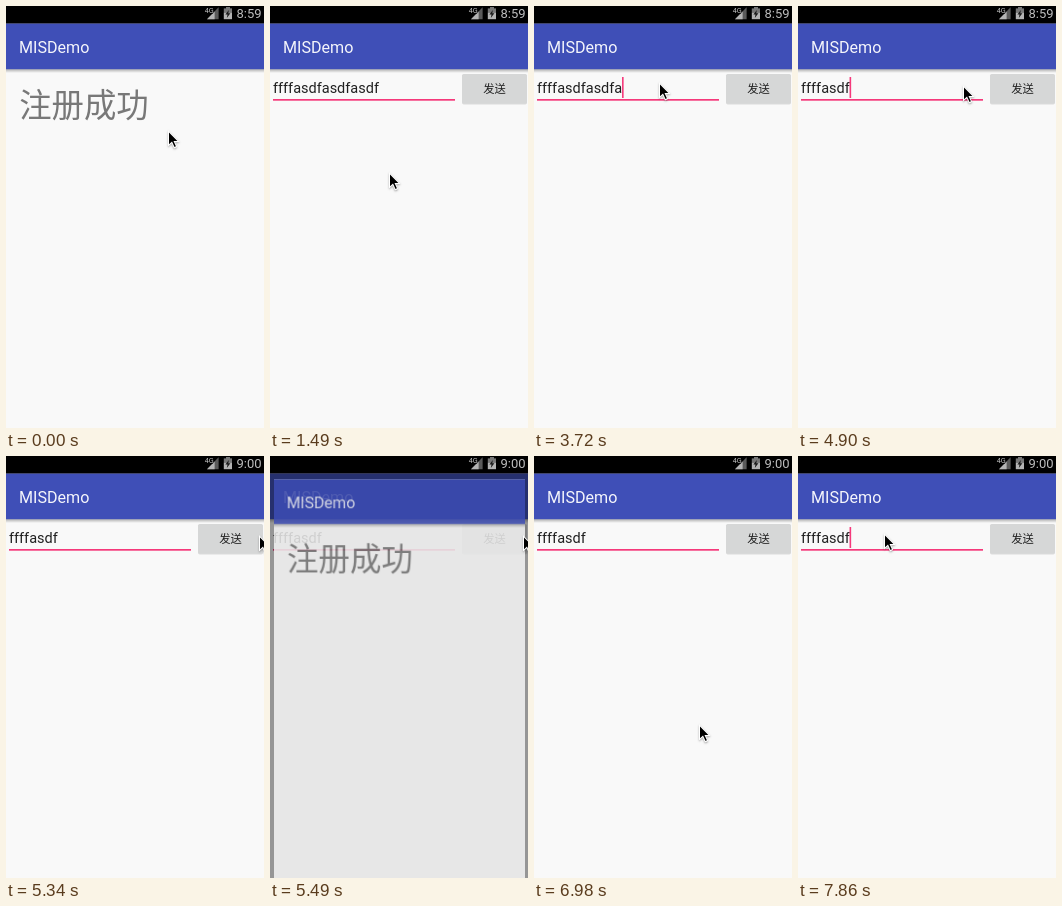
Write an HTML page with a canvas that moves like this. It is 258 by 422 pixels and loops after 8000 ms.

```html
<!DOCTYPE html>
<html lang="zh-CN">
<head>
<meta charset="utf-8">
<title>MISDemo</title>
<style>
html, body { margin: 0; width: 100%; height: 100%; overflow: hidden; background: #f9f9f9; }
canvas { display: block; width: 100%; height: 100%; }
</style>
</head>
<body>
<canvas id="stage"></canvas>
<script>
const W = 258, H = 422, LOOP = 8000;
const STATUS = 17.4, BAR_END = 63.2;
const WINDOW_H = 450; // the app window reaches past the lower edge of the stage
const ACCENT = '#f5397b';
const LATIN = 'Roboto, sans-serif';
const CJK = '"Noto Sans CJK SC", "Noto Sans CJK", sans-serif';
const ratio = window.devicePixelRatio || 1;

function setup(canvas, height) {
  canvas.width = W * ratio;
  canvas.height = height * ratio;
  const ctx = canvas.getContext('2d');
  ctx.scale(ratio, ratio);
  return ctx;
}
const ctx = setup(document.getElementById('stage'), H);
const layer = document.createElement('canvas');
const layerCtx = setup(layer, WINDOW_H);

// Each step changes part of the state and holds until the next one.
const steps = [
  [0, { page: 'done', text: 'ffffasdfasdfasdf', caret: false, handle: false, clock: '8:59', mouse: [162, 125] }],
  [140, { mouse: [146, 192] }],
  [290, { mouse: [119, 167] }],
  [1490, { page: 'form' }],
  [1640, { mouse: [110, 150] }],
  [1790, { mouse: [104, 125] }],
  [1940, { mouse: [116, 102] }],
  [2090, { mouse: [125, 85] }],
  [2230, { mouse: [125, 81] }],
  [2370, { mouse: [125, 78] }],
  [2520, { mouse: [125, 77] }],
  [2670, { caret: true }],
  [2820, { handle: true }],
  [3420, { text: 'ffffasdfasdfasd', handle: false }],
  [3570, { text: 'ffffasdfasdfas' }],
  [3720, { text: 'ffffasdfasdfa' }],
  [4310, { text: 'ffffasdfas' }],
  [4460, { text: 'ffffasdf' }],
  [4900, { mouse: [165, 80] }],
  [5050, { mouse: [215, 82], clock: '9:00' }],
  [5200, { mouse: [253, 80] }],
  [5340, { caret: false }],
  [5490, { page: 'opening' }],
  [5640, { page: 'done' }],
  [5780, { mouse: [215, 180] }],
  [5930, { mouse: [165, 269] }],
  [6980, { page: 'form' }],
  [7130, { mouse: [117, 132] }],
  [7280, { mouse: [98, 104] }],
  [7420, { mouse: [82, 84] }],
  [7710, { mouse: [86, 78] }],
  [7860, { caret: true }]
];

function stateAt(time) {
  return Object.assign({}, ...steps.filter(step => step[0] <= time).map(step => step[1]));
}

function rect(c, x, y, w, h, color) {
  c.fillStyle = color;
  c.fillRect(x, y, w, h);
}

function label(c, text, x, y, font, color, align = 'left') {
  c.font = font;
  c.fillStyle = color;
  c.textAlign = align;
  c.fillText(text, x, y);
}

function polygon(c, points, color) {
  c.beginPath();
  points.forEach(([x, y]) => c.lineTo(x, y));
  c.closePath();
  c.fillStyle = color;
  c.fill();
}

function drawPage(c) {
  rect(c, 0, STATUS, W, WINDOW_H, '#f9f9f9');
  const shade = c.createLinearGradient(0, 63, 0, 67);
  shade.addColorStop(0, 'rgba(0,0,0,.3)');
  shade.addColorStop(1, 'rgba(0,0,0,0)');
  rect(c, 0, 63, W, 4, shade);
  rect(c, 0, STATUS, W, BAR_END - STATUS, '#3f4fb7');
  label(c, 'MISDemo', 13, 47, '16.1px ' + LATIN, '#f4f5fb');
}

function drawDone(c) {
  drawPage(c);
  label(c, '注册成功', 13.2, 111.3, '500 32.4px ' + CJK, '#787878');
}

function drawForm(c, { text, caret, handle }) {
  drawPage(c);
  rect(c, 3, 93, 182, 1.7, ACCENT);
  label(c, text, 3, 87, '14.5px ' + LATIN, '#212121');
  const end = 3 + c.measureText(text).width;
  if (caret) rect(c, end - .2, 71, 1.6, 21, ACCENT);
  if (handle) drawHandle(c, end - .3);

  c.beginPath();
  c.roundRect(192, 68.6, 65, 30, 1.8);
  c.fillStyle = 'rgba(0,0,0,.12)';
  c.fill();
  c.beginPath();
  c.roundRect(192, 68, 65, 29.6, 1.8);
  c.fillStyle = '#d6d7d7';
  c.fill();
  label(c, '发送', 224.5, 87.3, '500 11.3px ' + CJK, '#212121', 'center');
}

function drawHandle(c, x) {
  c.fillStyle = ACCENT;
  c.beginPath();
  c.moveTo(x, 92);
  c.lineTo(x + 5.4, 97);
  c.arc(x, 102.5, 7.8, -Math.PI / 4, Math.PI * 1.25);
  c.closePath();
  c.fill();
}

function drawOpening(c, state) {
  drawForm(c, state);
  rect(c, 0, STATUS, W, H, 'rgba(0,0,0,.4)');
  layerCtx.clearRect(0, 0, W, WINDOW_H);
  drawDone(layerCtx);
  c.save();
  c.globalAlpha = .82;
  c.translate(150, 240);
  c.scale(.973, .973);
  c.translate(-150, -240);
  c.drawImage(layer, 0, 0, W, WINDOW_H);
  c.restore();
}

function drawStatus(c, clock) {
  rect(c, 0, 0, W, STATUS, '#000');
  polygon(c, [[201, 13.2], [212.6, 13.2], [212.6, 1.2]], '#5a5a5a');
  polygon(c, [[201, 13.2], [208.6, 13.2], [208.6, 5.4]], '#b4b4b4');
  rect(c, 198.5, 0, 8.6, 7.6, '#000');
  label(c, '4G', 198.8, 6.8, '7.2px ' + LATIN, '#c0c0c0');
  rect(c, 220, 1, 4, 2, '#777');
  rect(c, 217.8, 2.4, 8.2, 4, '#777');
  rect(c, 217.8, 6.4, 8.2, 6.8, '#b4b4b4');
  polygon(c, [[222.8, 4], [219.4, 8.6], [221.5, 8.6], [220.8, 12], [224.4, 7.2], [222.3, 7.2]], '#1a1a1a');
  label(c, clock, 255.5, 12, '13px ' + LATIN, '#bebebe', 'right');
}

function drawMouse(c, [x, y]) {
  c.save();
  c.translate(x, y);
  c.shadowColor = 'rgba(0,0,0,.35)';
  c.shadowBlur = 2 * ratio;
  c.shadowOffsetY = ratio;
  polygon(c, [[0, -1], [0, 15.6], [3.7, 12.2], [6, 17.4], [9.2, 16], [7.1, 11.2], [11.6, 11]], '#fff');
  c.shadowColor = 'transparent';
  polygon(c, [[1, 1.4], [1, 13.2], [4, 10.5], [6.5, 16], [7.9, 15.3], [5.5, 10.1], [9.4, 10]], '#000');
  c.restore();
}

const pages = { done: drawDone, form: drawForm, opening: drawOpening };

function frame() {
  const state = stateAt(performance.now() % LOOP);
  pages[state.page](ctx, state);
  drawStatus(ctx, state.clock);
  drawMouse(ctx, state.mouse);
  requestAnimationFrame(frame);
}
frame();
</script>
</body>
</html>
```
